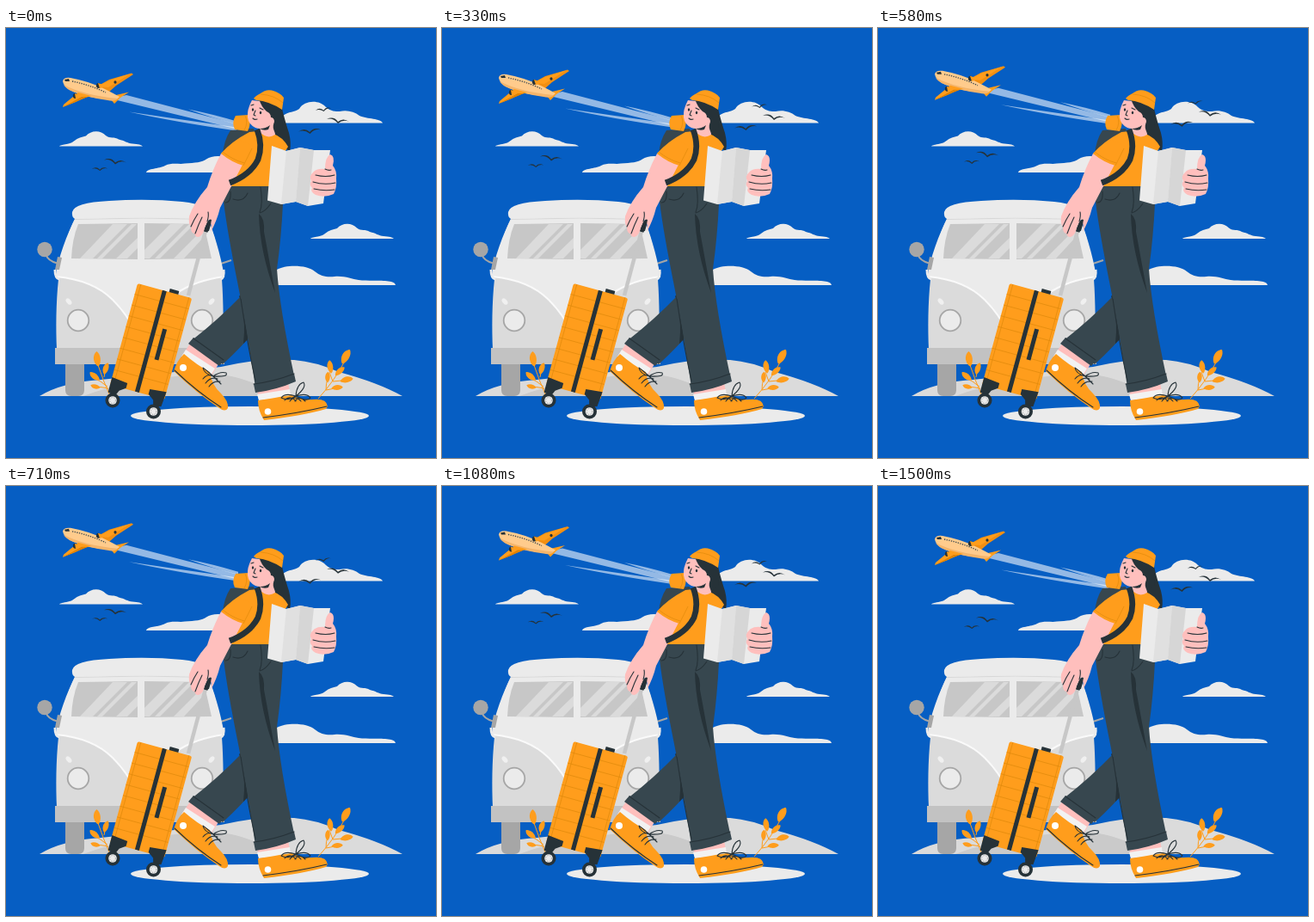
An HTML page that plays this animation: 500 px wide and 500 px high, repeating every 1.54 s.

```html
<!DOCTYPE html>
<html lang="en">
<head>
<meta charset="utf-8">
<title>Traveller</title>
<style>
html, body { margin: 0; width: 100%; height: 100%; overflow: hidden; background: #065ec3; }
svg { display: block; width: 100%; height: 100%; }
.ink { fill: none; stroke: #263238; stroke-width: 1.1; stroke-linecap: round; stroke-linejoin: round; }
.fold { fill: none; stroke: #e08a0c; stroke-width: .7; }
.orange { fill: #ff9d1c; }
.skin { fill: #ffbfbd; }
.dark { fill: #263238; }
.denim { fill: #37474f; }
.pale { fill: #ebebeb; }
.grey { fill: #a6a6a6; }
</style>
</head>
<body>
<svg viewBox="0 0 500 500">
  <defs>
    <path id="cloud" d="M62 137.500C63 135 74 136 79 131.500C84 127.500 88 127 93 125.500C98 119 110 118 116 125C121 129 126 126 131 129.500C138 131 141 134 147 134.500Q157 135 159 137.500Z"/>
    <path id="leaf" d="M0 9C-6 4-5-6 1-9C5-5 5 4 0 9Z"/>
    <path id="bird" d="M-13-2Q-5-6 0 1Q6-4 13 1Q6-2 0 3Q-6-4-13-2Z"/>
    <g id="wheel"><circle r="8.500" class="dark"/><circle r="4.800" class="pale"/><circle r="3.400" fill="none" stroke="#a6a6a6" stroke-dasharray="1.400 1.400"/></g>
  </defs>
  <rect width="500" height="500" fill="#065ec3"/>

  <g class="pale">
    <use href="#cloud"/>
    <use href="#cloud" x="292" y="107.500"/>
    <path d="M163 168C164 163 178 164 185 160C193 156 202 159 208 157.500C220 157 228 156 233 152.500C238 149 246 148 256 150L270 168Z"/>
    <path d="M318 110.500L322 102C328 97 336 98 341 94C347 84 364 83 372 92C378 97 383 97 388 97C396 95 405 97 411 102C420 106 436 105 438 110.500Z"/>
    <path d="M313 299L315 281C325 275 350 275 359 283C366 289 374 290 382 289C394 288 402 292 410 293C425 295 452 291 453 299Z"/>
  </g>

  <path fill="#dbdbdb" d="M39 428Q65 412 110 409Q180 402 250 394Q290 384 335 386Q360 388 387 400Q432 412 461 428Z"/>
  <path fill="#cacaca" d="M90 428Q150 405 245 402Q290 408 312 428Z"/>
  <ellipse class="pale" cx="283.500" cy="451" rx="138.500" ry="11"/>

  <!-- van -->
  <g>
    <path class="grey" d="M69 385H91V421Q91 428 84 428H76Q69 428 69 421Z"/>
    <path d="M46 262Q48 271 61 274M250 274L262 270" fill="none" stroke="#a6a6a6" stroke-width="2"/>
    <circle class="grey" cx="45" cy="257.500" r="8.700"/>
    <path fill="#dbdbdb" d="M81 220C71 240 62 268 61 292C58 320 58 350 59 374H252C253 350 253 320 251 292C248 262 242 238 234 220Z"/>
    <path class="pale" d="M81 220C71 240 60 268 58 289Q101 293 124 316Q142 334 149 352H163Q190 298 254 289C249 262 242 238 234 220Z"/>
    <path d="M58 289Q101 293 124 316Q142 334 149 352M163 352Q185 298 254 289" fill="none" stroke="#fafafa" stroke-width="2"/>
    <path d="M57 281Q57 291 62 292M253 281Q254 290 250 292" fill="none" stroke="#ebebeb" stroke-width="3"/>
    <path class="grey" d="M60 266L65 267L62 281H57Z"/>
    <path d="M80 222.500Q160 219.500 238 222.500" fill="none" stroke="#d8d8d8"/>
    <path class="pale" d="M77 214Q79 203 120 201Q165 198 205 202Q238 205 240 222Q160 219 80 222Q76 219 77 214Z"/>
    <g fill="#c7c7c7">
      <path d="M84 228L153 227V269L76 268Q77 245 84 228Z"/>
      <path d="M161 227L230 228L239 268L161 269Z"/>
    </g>
    <g fill="#dbdbdb">
      <path d="M86 268L124 228H141L101 268ZM106 268L146 228H152L112 268ZM128 268L153 244V256L141 268Z"/>
      <path d="M161 258L191 228H207L167 268H161ZM173 268L213 228H219L179 268ZM195 268L229 234L232 241L207 268Z"/>
    </g>
    <g fill="#ebebeb" stroke="#a6a6a6" stroke-width="1.800"><circle cx="84" cy="340" r="12.300"/><circle cx="228" cy="340" r="12.300"/></g>
    <g fill="#f0f0f0"><ellipse cx="73" cy="318" rx="2.600" ry="4.300" transform="rotate(-40 73 318)"/><ellipse cx="239" cy="318" rx="2.600" ry="4.300" transform="rotate(40 239 318)"/></g>
    <path fill="#c2c2c2" d="M57 372H254V391H57Z"/>
  </g>

  <!-- plants -->
  <g class="orange">
    <path d="M121 428Q113 410 107 392M118 417Q110 410 100 406M119 419Q110 417 100 417M114 406L116 396" fill="none" stroke="#ff9d1c"/>
    <use href="#leaf" transform="translate(106 385) rotate(-10)"/>
    <use href="#leaf" transform="translate(103 405) rotate(-55) scale(.8)"/>
    <use href="#leaf" transform="translate(104 417) rotate(-80) scale(.65)"/>
    <use href="#leaf" transform="translate(116 396) rotate(15) scale(.8)"/>
    <path d="M363 431Q382 410 393 389M380 411Q376 402 376 396M372 421Q372 413 374 408M380 411L400 409M384 404L390 398M372 421L388 418" fill="none" stroke="#ff9d1c"/>
    <use href="#leaf" transform="translate(395 382) rotate(25) scale(1.100 1.050)"/>
    <use href="#leaf" transform="translate(377 394) rotate(-12) scale(.85)"/>
    <use href="#leaf" transform="translate(388 399) rotate(45) scale(.8)"/>
    <use href="#leaf" transform="translate(374 406) scale(.7)"/>
    <use href="#leaf" transform="translate(396 409) rotate(75) scale(.85)"/>
    <use href="#leaf" transform="translate(385 418) rotate(82) scale(.75)"/>
  </g>

  <!-- plane and birds, drifting together -->
  <g id="plane">
    <g fill="#fff" fill-opacity=".57">
      <path d="M121 82L140 78L270 112V118Z"/>
      <path d="M212 94.500Q240 100 270 109V112.500Q238 104 212 94.500Z"/>
      <path d="M143 97.500Q200 106 268 115.500V119.500Q195 109 143 97.500Z"/>
    </g>
    <path fill="#f28f12" d="M104 69L120 60L146 52.500L148 54L128 67L119 75Z"/>
    <path class="orange" d="M106 68L121 60.500L144 53.500L119 69Z"/>
    <path class="orange" d="M117 77L128 78L143 74.500L133 81L126 88Z"/>
    <path fill="#ffcb8c" d="M66 62Q67 57 75 58Q97 62 115 71Q125 76 132 80Q128 85 118 83Q95 81 78 74Q67 69 66 62Z"/>
    <path fill="#f5b56b" d="M67 66Q90 78 130 82Q127 86 118 84Q95 81 78 74Q70 71 67 66Z"/>
    <path class="orange" d="M84 75L99 79Q88 82 81 86L66 92L67 89Z"/>
    <path fill="#e08200" d="M88 80L95 80L81 86L66 92Z"/>
    <g class="dark"><ellipse cx="107.500" cy="67" rx="2.600" ry="3"/><ellipse cx="80.500" cy="79" rx="2.600" ry="3"/><ellipse cx="127" cy="63" rx="1.600" ry="1.800"/><path d="M68 60L73 59L74 62L69 62Z"/></g>
    <path class="orange" d="M107 64L113 66Q115 69 109 70ZM80 76L86 78Q87 82 81 82Z"/>
    <path d="M77 62Q97 66 116 75" fill="none" stroke="#37474f" stroke-width="1.300" stroke-dasharray="1.300 1.400"/>
  </g>
  <g id="birds" class="dark">
    <use href="#bird" transform="translate(127 155.500)"/>
    <use href="#bird" transform="translate(109 164) rotate(-8) scale(.7)"/>
    <use href="#bird" transform="translate(386 108)"/>
    <use href="#bird" transform="translate(353 120) rotate(-12)"/>
    <use href="#bird" transform="translate(369 95) rotate(-15) scale(.7)"/>
  </g>

  <!-- suitcase -->
  <path d="M212 311L232 236" stroke="#c7c7c7" stroke-width="4.500" fill="none"/>
  <path d="M232 237L236 226" stroke="#263238" stroke-width="5" fill="none"/>
  <g transform="translate(153 297) rotate(15.200)">
    <path class="dark" d="M38-4H49V4H38Z"/>
    <rect class="orange" width="65.500" height="122" rx="2"/>
    <g id="ribs" class="fold"></g>
    <path class="dark" d="M30 0H35V122H30ZM42 43H47V80H42ZM0 113L19 115V121L12 126L9 133L0 131ZM65.500 113L46 115V121L53 126L55 133L64 131Z"/>
  </g>
  <use href="#wheel" x="124" y="433"/>
  <use href="#wheel" x="171.500" y="446"/>

  <!-- back leg -->
  <g>
    <path class="skin" d="M216 364L250 386L239 404L204 382Z"/>
    <path fill="#f2f2f2" d="M209 374L243 396L238 404L204 382Z"/>
    <path class="orange" d="M207 379Q222 392 237 400Q239 415 250 425Q259 434 258 442Q255 447 248 442Q222 425 195 399Q199 386 207 379Z"/>
    <path class="ink" d="M196 398Q222 423 250 441" stroke-width=".6"/>
    <circle cx="206" cy="395" r="4" fill="#fff"/>
    <path class="ink" d="M229 408Q235 401 242 405M232 413Q238 405 246 408M236 417Q241 410 249 411M241 405Q232 397 229 395Q230 402 241 405Q249 399 256 401Q259 406 241 405L250 414"/>
    <path class="denim" d="M262 215L300 240L296 345Q272 373 252 391L215 364Q247 339 273 312Z"/>
    <path class="denim" d="M218 360L254 386L248 393L212 367Z"/>
    <path class="ink" d="M218 361L253 386" stroke-width=".9"/>
    <path class="dark" d="M271 312L279 303L281 362L276 367Q279 340 274 318Z"/>
  </g>

  <!-- front leg -->
  <g>
    <path class="skin" d="M292 419L328 412L331 429L294 433Z"/>
    <path fill="#f2f2f2" d="M292 426L330 420L331 429L294 433Z"/>
    <path class="orange" d="M293 433Q308 431 318 429L332 427Q344 433 356 432Q373 430 374 440L372 443Q345 451 300 456Q293 445 293 433Z"/>
    <path class="ink" d="M299 453Q340 448 373 440" stroke-width=".6"/>
    <circle cx="304.500" cy="446" r="3.800" fill="#fff"/>
    <path class="ink" d="M324 433Q330 426 337 434M330 434Q336 426 343 434M336 434Q341 427 348 434M337 428Q324 424 320 430Q328 434 337 428Q338 414 346 412Q350 418 337 428Q350 424 354 430Q350 435 337 428"/>
    <path class="denim" d="M257 183L308 183L322 204Q320 245 315 280Q318 325 335 404L290 418Q280 350 270 300Q257 235 253 202Q253 192 257 183Z"/>
    <path class="denim" d="M288 414Q312 411 335 402L337 411Q314 421 290 424Z"/>
    <path class="ink" d="M288 414Q312 411 335 402M273 315Q281 370 290 410" stroke-width=".9"/>
    <path class="dark" d="M294 216Q301 221 300 237L313 308Q295 260 294 216Z"/>
    <path class="ink" d="M296 185Q299 205 295 214M308 204Q301 214 295 215M261 190Q262 203 255 203M264 199Q276 203 281 192" stroke-width=".8"/>
  </g>

  <!-- backpack, back hair, shirt -->
  <path class="denim" d="M261 119Q253 131 252 148L262 160L292 132L288 117Z"/>
  <path class="orange" d="M267 102L282 101Q286 110 281 120L266 118Q262 110 267 102Z"/>
  <path d="M278 102Q282 110 277 119" class="fold"/>
  <path class="dark" d="M300 88Q313 86 321 94Q325 110 329 122Q332 134 330 143L306 130Z"/>
  <path class="orange" d="M283 121Q297 119 311 123Q322 127 328 138L311 165L308 184H258Q261 170 267 160L250 146Q262 132 283 121Z"/>
  <path class="skin" d="M295 112L311 108L313 124Q304 130 295 121Z"/>
  <path class="skin" d="M250 146Q240 165 234 185Q219 202 213 219Q212 228 215 231Q215 239 219 239Q221 245 226 242Q230 239 231 232L236 222Q240 228 238 237Q245 225 249 209Q260 188 275 159Z"/>
  <path class="ink" d="M215 231Q219 222 223 216M220 239Q224 228 228 220M234 225Q236 218 235 214" stroke-width=".9"/>
  <path class="dark" d="M231 237Q234 220 239 223Q238 230 236 236Z"/>
  <path class="orange" d="M250 146Q259 137 270 129L287 137L276 160Q262 156 250 146Z"/>
  <path class="fold" d="M276 160L286 140M252 144Q263 153 277 157"/>
  <path d="M292 118Q299 137 293 153Q284 171 260 180" fill="none" stroke="#263238" stroke-width="6.800"/>

  <!-- head -->
  <path class="skin" d="M286 84L309 87L312 104L307 113Q298 119 290 116Q282 112 281 104Q280 95 286 84Z"/>
  <path class="dark" d="M294 82Q312 83 321 93L322 116L313 122Q309 115 312 110Q312 104 308 104Q308 99 303 97Q297 92 294 82Z"/>
  <path class="skin" d="M306 105Q312 103 312 109Q310 115 305 112Z"/>
  <path class="dark" d="M295 117Q302 117 307 113L305 118Q300 120 295 117Z"/>
  <path class="orange" d="M288 82Q290 79 296 76Q302 71 309 72.500Q319 75 323 81L321 95Q306 85 291 84Z"/>
  <path class="fold" d="M296 77Q312 78 322 87"/>
  <g class="dark"><ellipse cx="287" cy="95" rx="1.200" ry="1.700"/><ellipse cx="296" cy="98.500" rx="1.200" ry="1.700"/></g>
  <path class="ink" d="M285 90L288 89M295 93L299 95M290 96L288 101L290 102M287 105Q289 107 292 106" stroke-width=".9"/>

  <!-- map and hand -->
  <path class="pale" d="M309 137L326 143L342 139L358 142L377 142L369 204L351 207L337 202L320 205L304 200.500Z"/>
  <path fill="#e0e0e0" d="M326 143L342 139L337 202L320 205Z"/>
  <path fill="#d6d6d6" d="M342 139L358 142L351 207L337 202Z"/>
  <path class="skin" d="M371 164Q371 150 377 147Q383 149 380 160Q385 166 384 175Q385 186 381 193Q370 198 360 194Q353 190 356 186Q352 182 355 178Q352 172 357 168Q361 163 371 164Z"/>
  <path class="ink" d="M360 171Q372 174 382 171M357 179Q370 183 383 180M358 187Q370 190 382 188M371 164Q375 166 378 165" stroke-width=".9"/>
</svg>
<script>
const LOOP = 1540, LIFT = 9.2, LEAD = 25;
const get = id => document.getElementById(id);
const floaters = [get("plane"), get("birds")];

let ribs = "M4 0V120M62 0V120";
for (let y = 13; y < 115; y += 13) ribs += `M0 ${y}H65`;
get("ribs").innerHTML = `<path d="${ribs}"/>`;

function draw(ms) {
  const phase = 2 * Math.PI * (ms + LEAD) / LOOP;
  const y = -LIFT * (1 - Math.cos(phase)) / 2;
  for (const el of floaters) el.setAttribute("transform", `translate(0 ${y.toFixed(2)})`);
}

let start;
function tick(now) {
  start ??= now;
  draw((now - start) % LOOP);
  requestAnimationFrame(tick);
}
draw(0);
requestAnimationFrame(tick);
</script>
</body>
</html>
```
